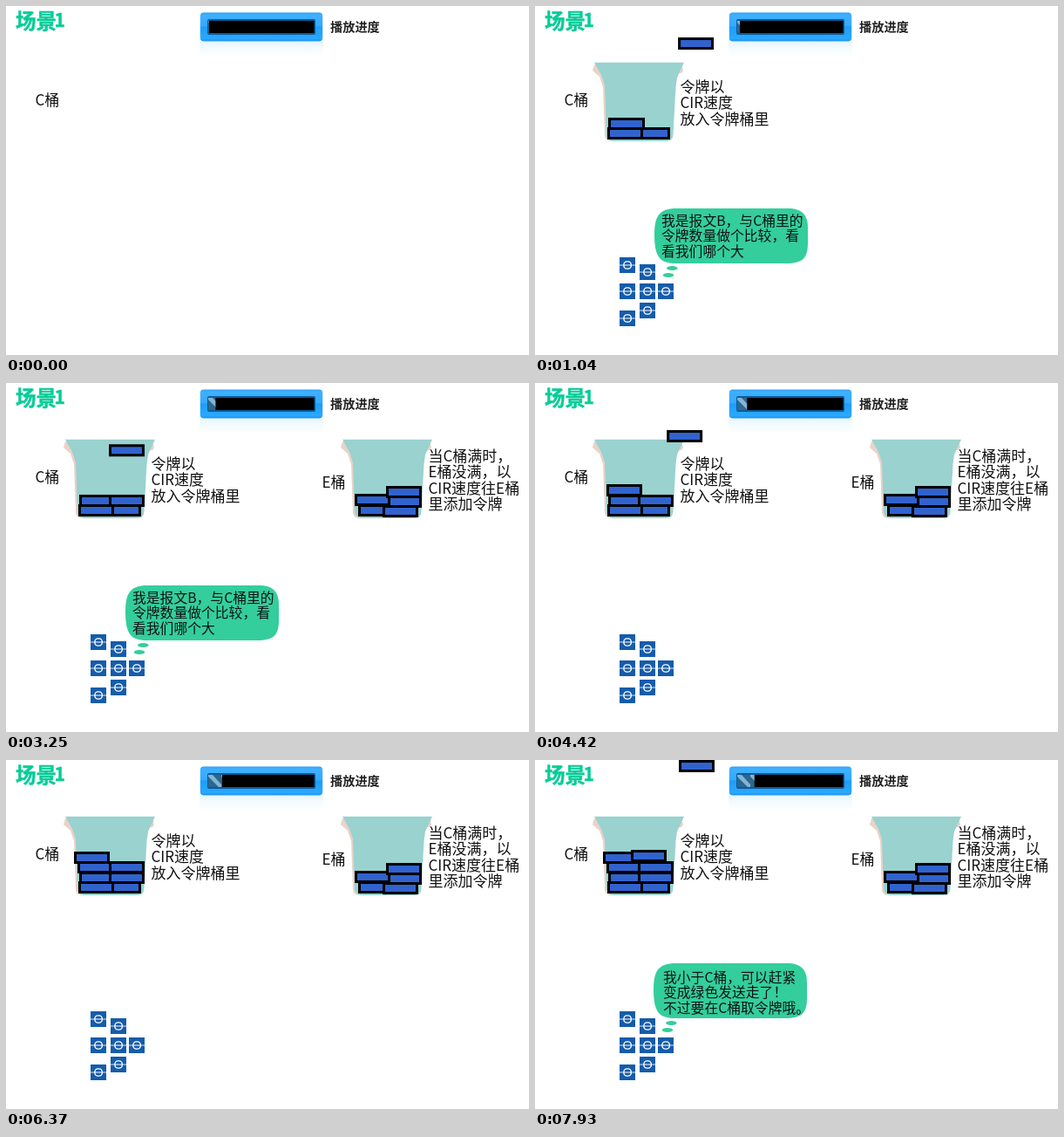
Recreate the animation shown at these times as an HTML page. Size 600x400 px, loop 8000 ms.

```html
<!DOCTYPE html>
<html lang="zh">
<head>
<meta charset="utf-8">
<style>
html, body { margin: 0; width: 100%; height: 100%; overflow: hidden; background: #fff; }
svg { display: block; width: 600px; height: 400px; }
text { font-family: "Noto Sans CJK SC", "Noto Sans CJK", "Noto Sans", sans-serif; white-space: pre; fill: #111; }
.note { font-size: 17px; font-weight: 350; }
.talk { font-size: 15.8px; font-weight: 350; }
.title { font-size: 23.5px; font-weight: 900; fill: #08cc98; stroke: #08cc98; stroke-width: .5; }
.caption { font-size: 14.2px; font-weight: 700; fill: #222; }
.token { fill: #3163ce; stroke: #000; stroke-width: 3; }
.bubble { fill: #33ce9c; }
</style>
</head>
<body>
<svg viewBox="0 0 600 400">
  <defs>
    <linearGradient id="shell" x2="0" y2="1">
      <stop offset="0" stop-color="#2aa0fb"/><stop offset=".08" stop-color="#40b0ff"/>
      <stop offset=".46" stop-color="#35a9ff"/><stop offset=".5" stop-color="#1d9dfb"/>
      <stop offset=".9" stop-color="#2ba8ff"/><stop offset="1" stop-color="#1b93ee"/>
    </linearGradient>
    <linearGradient id="mirror" x2="0" y2="1">
      <stop offset="0" stop-color="#e6f6fe"/><stop offset=".4" stop-color="#f3fbff"/>
      <stop offset="1" stop-color="#fff"/>
    </linearGradient>
    <pattern id="stripes" width="15" height="14" patternUnits="userSpaceOnUse" x="232" y="17">
      <path d="M0 0H15V14H0Z" fill="#2b678f"/>
      <path d="M0 0H5L15 11V14H12L0 2Z" fill="#82b4d6"/>
    </pattern>
    <clipPath id="wipeC"><rect y="50" height="115"/></clipPath>
    <clipPath id="wipeE"><rect y="50" height="115"/></clipPath>
    <clipPath id="wipeAsk"><rect y="225" height="95"/></clipPath>
    <g id="bucket">
      <path d="M68 67L66 74L74 81L78 93L80 149Q81 155 88 155H100V80L168 77L170 74L168 66Z" fill="#ead2c8"/>
      <path d="M68 64.7H171L163 82L161.5 93L158.5 147Q158 155 151 155H90Q83 154 82 148L80 91L76 79Z" fill="#99d2cf"/>
    </g>
    <g id="packet">
      <path d="M0 0H18V18H0Z" fill="#155cab"/>
      <path d="M0 9H18" stroke="#d5e4f4" stroke-width="1"/>
      <rect x="4.9" y="4.9" width="8.4" height="8.2" rx="3.6" fill="#155cab" stroke="#fff" stroke-width="1.4"/>
      <path d="M5 9H13" stroke="#fff" stroke-width="1"/>
    </g>
    <g id="cloud" class="bubble">
      <path d="M137 262C137 240 143 232 163 232H290C307 232 313 240 313 254V272C313 289 307 295 288 295H161C143 295 137 287 137 262Z"/>
      <ellipse cx="157.3" cy="300.5" rx="6.2" ry="2.6"/>
      <ellipse cx="153" cy="308.5" rx="6.2" ry="2.6"/>
    </g>
  </defs>

  <text class="title" x="11" y="25.5">场景</text>
  <text class="title" x="55.5" y="24" style="font-size:21px">1</text>

  <path d="M222 41H364V58H222Z" fill="url(#mirror)"/>
  <rect x="222.8" y="7.5" width="140.4" height="33" rx="4" fill="url(#shell)"/>
  <rect x="231" y="15" width="124" height="18" rx="2" fill="#0c5c98"/>
  <rect x="233" y="17" width="120.5" height="14" fill="#000"/>
  <rect id="fill" x="232" y="17" height="14" fill="url(#stripes)"/>
  <text class="caption" x="372" y="28.8">播放进度</text>

  <g clip-path="url(#wipeC)">
    <text class="note" x="33.5" y="114">C桶</text>
    <use href="#bucket"/>
    <g id="tokensC"></g>
    <g id="notesC"></g>
  </g>
  <g clip-path="url(#wipeE)">
    <text class="note" x="362.5" y="119.5">E桶</text>
    <use href="#bucket" x="318"/>
    <g id="tokensE"></g>
    <g id="notesE"></g>
  </g>
  <g id="falling"></g>

  <g id="packets"></g>
  <g id="ask" clip-path="url(#wipeAsk)"><use href="#cloud"/></g>
  <g id="reply"><use href="#cloud" x="-1" y="1"/></g>
</svg>
<script>
const LOOP = 8000, STEP = 130;
const $ = id => document.getElementById(id);

function add(parent, tag, attrs, text) {
  const el = document.createElementNS("http://www.w3.org/2000/svg", tag);
  for (const k in attrs) el.setAttribute(k, attrs[k]);
  if (text) el.textContent = text;
  return $(parent).appendChild(el);
}
const token = (parent, x, y, w = 41) =>
  add(parent, "rect", { class: "token", x: x + 1.5, y: y + 1.5, width: w - 3, height: 11 });
const lines = (parent, cls, x, y, gap, rows) =>
  rows.forEach((s, i) => add(parent, "text", { class: cls, x, y: y + i * gap }, s));

[[83, 139], [121, 139, 34], [84, 128, 42]].forEach(p => token("tokensC", ...p));
[[404, 139], [400, 127], [438, 129, 39], [436, 118], [432, 140]].forEach(p => token("tokensE", ...p));
lines("notesC", "note", 166.5, 98.5, 18.5, ["令牌以", "CIR速度", "放入令牌桶里"]);
lines("notesE", "note", 484.5, 89.5, 18.5, ["当C桶满时，", "E桶没满，以", "CIR速度往E桶", "里添加令牌"]);
lines("ask", "talk", 145, 252, 17.4, ["我是报文B，与C桶里的", "令牌数量做个比较，看", "看我们哪个大"]);
lines("reply", "talk", 147, 255, 17.4, ["我小于C桶，可以赶紧", "变成绿色发送走了！", "不过要在C桶取令牌哦。"]);
[[97, 288], [120, 296], [97, 318], [120, 318], [141, 318], [120, 340], [97, 349]]
  .forEach(([x, y]) => add("packets", "use", { href: "#packet", x, y }));

// start, end, from x, from y, to x, to y
const drops = [
  [650, 2333, 178, 8.3, 118, 128],
  [2600, 3640, 178, -6, 82, 116],
  [3770, 5167, 180, 0, 118, 116],
  [5200, 6240, 176, 0, 78, 105],
  [6500, 7560, 178, 0, 110, 103],
  [7800, 7930, 172, -10, 165, 0]
].map(d => ({ d, el: token("falling", 0, 0) }));

const ramp = (t, a, b) => Math.min(1, Math.max(0, (t - a) / (b - a)));
const wipe = (id, x) => document.querySelector(`#${id} rect`).setAttribute("width", Math.max(0, x));

function draw(t) {
  $("fill").setAttribute("width", 0.5 + t * 0.00243);
  wipe("wipeC", 62.5 + t * 0.2077);
  wipe("wipeE", 448 + (t - 1820) * 0.2077);
  wipe("wipeAsk", 137 + t * 0.176);
  $("packets").setAttribute("transform", `translate(${-168 * (1 - ramp(t, 0, 1040))} 0)`);
  $("ask").setAttribute("opacity", 1 - ramp(t, 3450, 3960));
  $("reply").setAttribute("opacity", ramp(t, 7100, 7620));
  for (const { d: [a, b, x0, y0, x1, y1], el } of drops) {
    const k = ramp(t, a, b);
    el.setAttribute("visibility", t >= a ? "visible" : "hidden");
    el.setAttribute("transform", `translate(${x0 + (x1 - x0) * k} ${y0 + (y1 - y0) * k})`);
  }
}

const begin = performance.now();
function tick() {
  const t = (performance.now() - begin) % LOOP;
  draw(Math.floor(t / STEP) * STEP);
  requestAnimationFrame(tick);
}
tick();
</script>
</body>
</html>
```
